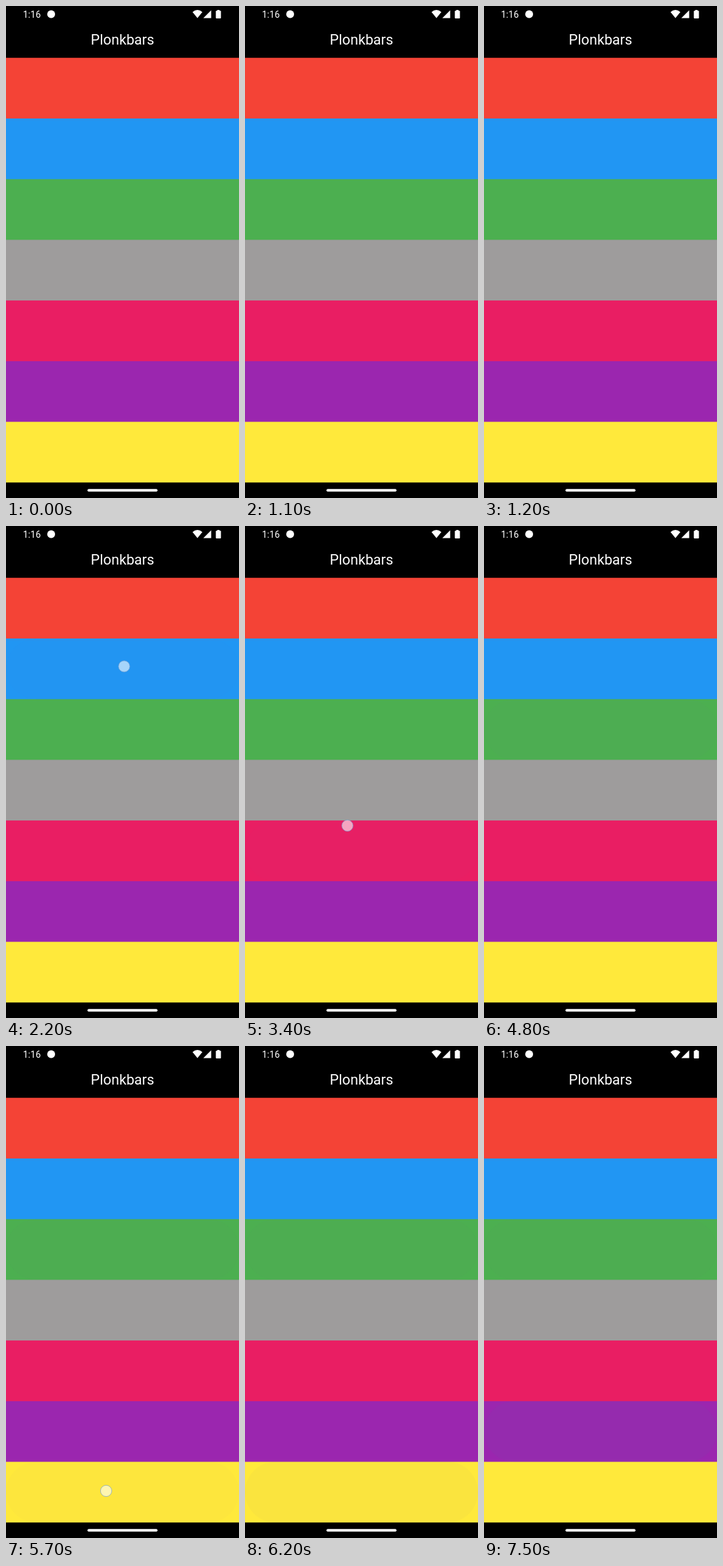
These frames come from a looping animation (356x752 px, 8 s). An HTML page:

```html
<!DOCTYPE html>
<html lang="en">
<head>
<meta charset="utf-8">
<title>Plonkbars</title>
<style>
  html, body { margin: 0; width: 100%; height: 100%; overflow: hidden; background: #000; }
  svg { display: block; width: 100%; height: 100%; }
  text { font-family: Roboto, sans-serif; fill: #fff; }
</style>
</head>
<body>
<svg viewBox="0 0 356 752">
  <rect width="356" height="752"/>
  <g id="bars"></g>
  <g id="glows" fill="#6750a4"></g>
  <rect id="footer" width="356" height="24"/>
  <g fill="#fff">
    <text x="26" y="18" font-size="14">1:16</text>
    <circle cx="69" cy="12.5" r="6"/>
    <path d="M285 9.2Q292.5 3 300 9.2L292.5 18.6Z"/>
    <path d="M301.5 18.6H313.5V6.4Z"/>
    <rect x="322.7" y="6" width="3.6" height="3"/>
    <rect x="320.6" y="7.3" width="7.8" height="11.7" rx="1"/>
    <text x="178" y="58.5" font-size="21.7" text-anchor="middle">Plonkbars</text>
    <rect x="124.5" y="738.3" width="107" height="3.9" rx="1.95"/>
  </g>
  <circle id="touch" r="8.6" fill="#fff" fill-opacity=".6" stroke="#78a0d2" stroke-opacity=".7"/>
</svg>
<script>
const LOOP = 8000, TOP = 79.2, BOTTOM = 728.3;
const colors = ['#f44336', '#2196f3', '#4caf50', '#9e9c9c', '#e91e63', '#9b26af', '#ffe93b'];
const BAR = (BOTTOM - TOP) / colors.length;

// The pressed bar tints to `tint`, then clears at `end`.
const taps = [
  { bar: 1, x: 180.5, y: 214.5, start: 2200, end: 2600, tint: .03 },
  { bar: 4, x: 156.5, y: 458, start: 3400, end: 4700, tint: .035 },
  { bar: 2, x: 177, y: 312, start: 4700, end: LOOP, tint: .02 },
  { bar: 6, x: 153, y: 680, start: 5700, end: 6400, tint: .03 },
  { bar: 5, x: 170, y: 588, start: 7200, end: LOOP, tint: .11 },
];

const byId = id => document.getElementById(id);

function addRect(parent, attributes) {
  const rect = document.createElementNS('http://www.w3.org/2000/svg', 'rect');
  for (const [key, value] of Object.entries({ width: 356, ...attributes }))
    rect.setAttribute(key, value);
  return parent.appendChild(rect);
}

// Each bar reaches down to the footer, so neighbours blend without a dark seam.
colors.forEach((fill, bar) => {
  const y = TOP + bar * BAR;
  addRect(byId('bars'), { y, height: BOTTOM + 1 - y, fill });
});
for (const tap of taps)
  tap.glow = addRect(byId('glows'), { y: TOP + tap.bar * BAR, height: BAR, rx: BAR / 2 });
byId('footer').setAttribute('y', BOTTOM);

function draw(now) {
  const time = now % LOOP;
  const touch = byId('touch');
  const pressed = taps.find(tap => time >= tap.start && time < tap.start + 100);
  touch.setAttribute('visibility', pressed ? 'visible' : 'hidden');
  if (pressed) {
    touch.setAttribute('cx', pressed.x);
    touch.setAttribute('cy', pressed.y);
  }
  for (const { glow, start, end, tint } of taps) {
    const active = time >= start && time < end;
    glow.setAttribute('opacity', active ? tint * Math.min(1, .5 + (time - start) / 300) : 0);
  }
  requestAnimationFrame(draw);
}
draw(performance.now());
</script>
</body>
</html>
```
